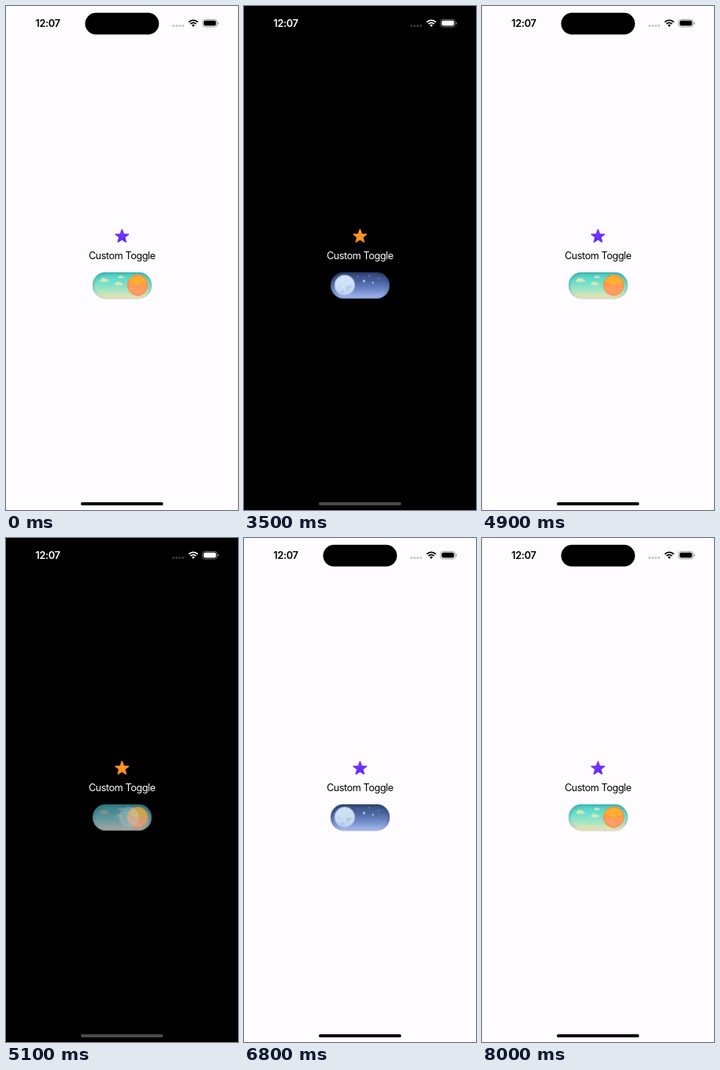
Recreate the animation shown at these times as an HTML page with a canvas. Size 300 by 651 pixels, loop 8100 ms.

```html
<!DOCTYPE html>
<html lang="en">
<head>
<meta charset="utf-8">
<title>Custom Toggle</title>
<style>
html, body { margin: 0; width: 100%; height: 100%; overflow: hidden; background: #fefcff; }
canvas { display: block; width: 300px; height: 651px; }
</style>
</head>
<body>
<canvas id="stage"></canvas>
<script>
const W = 300, H = 651, LOOP = 8100, STEP = 100;
const TAU = Math.PI * 2;
const scale = Math.max(1, window.devicePixelRatio || 1);
const stage = document.getElementById('stage');
stage.width = W * scale;
stage.height = H * scale;
const ctx = stage.getContext('2d');
ctx.scale(scale, scale);

// Each tap: first visible time and how far the spring has already run (ms).
const taps = [
  { at: 2600, lead: 142, night: true },
  { at: 3700, lead: 63, night: false },
  { at: 5100, lead: 80, night: true },
  { at: 6800, lead: 16, night: false }
];
const STIFF = 13;
const DAY_X = 170.3, NIGHT_X = 130.2, KNOB_Y = 360.5;
const pill = { x: 112, y: 343.7, w: 76.4, h: 34.3 };

const themes = {
  day: { bg: '#fefcff', ink: '#000', star: ['#8036f0', '#5a2bff'], dots: '#c5c3c7', home: '#000', shell: '#8f8d92' },
  night: { bg: '#000', ink: '#fff', star: ['#ff9a2c', '#ff8a1e'], dots: '#3c3c3c', home: '#4a4a4a', shell: '#8a8a8a' }
};

function spring(ms) {
  const k = STIFF * ms / 1000;
  return 1 - (1 + k) * Math.exp(-k);
}

function disc(c, x, y, r, fill) {
  c.fillStyle = fill;
  c.beginPath();
  c.arc(x, y, r, 0, TAU);
  c.fill();
}

function box(c, x, y, w, h, r, fill) {
  c.fillStyle = fill;
  c.beginPath();
  c.roundRect(x, y, w, h, r);
  c.fill();
}

function ramp(c, y0, y1, colors) {
  const g = c.createLinearGradient(0, y0, 0, y1);
  colors.forEach((color, i) => g.addColorStop(i / (colors.length - 1), color));
  return g;
}

function layer(w, h, draw) {
  const canvas = document.createElement('canvas');
  canvas.width = Math.ceil(w * scale);
  canvas.height = Math.ceil(h * scale);
  const c = canvas.getContext('2d');
  c.scale(scale, scale);
  draw(c);
  return { canvas, w: canvas.width / scale, h: canvas.height / scale };
}

// Recessed capsule: scenery plus a soft shade along the upper rim.
function track(colors, shade, scenery) {
  return layer(pill.w, pill.h, c => {
    c.beginPath();
    c.roundRect(0, 0, pill.w, pill.h, pill.h / 2);
    c.clip();
    c.fillStyle = ramp(c, 0, pill.h, colors);
    c.fillRect(0, 0, pill.w, pill.h);
    scenery(c);
    c.shadowColor = shade;
    c.shadowBlur = 5 * scale;
    c.shadowOffsetY = 1.6 * scale;
    c.fillStyle = shade;
    c.beginPath();
    c.rect(-20, -20, pill.w + 40, pill.h + 40);
    c.roundRect(0, 0, pill.w, pill.h, pill.h / 2);
    c.fill('evenodd');
  });
}

function cloud(c, x, y, s) {
  const fill = ramp(c, y - 3 * s, y + 3 * s, ['#f1e6ac', '#c9e7bd']);
  c.fillStyle = fill;
  c.beginPath();
  c.ellipse(x, y + s, 6 * s, 1.7 * s, 0, 0, TAU);
  c.fill();
  disc(c, x - 1.8 * s, y - 0.2 * s, 2.3 * s, fill);
  disc(c, x + 1.7 * s, y + 0.1 * s, 2 * s, fill);
}

function twinkle(c, x, y, r) {
  c.fillStyle = '#bcd0f5';
  c.beginPath();
  for (let i = 0; i < 8; i++) {
    const a = i * TAU / 8, d = i % 2 ? r * 0.42 : r;
    c.lineTo(x + d * Math.cos(a), y + d * Math.sin(a));
  }
  c.fill();
}

const daySky = track(['#4acfc6', '#66dfce', '#a2e5c5', '#f4e4b0'], 'rgba(15,85,100,.62)', c => {
  cloud(c, 15.3, 10, 1);
  cloud(c, 36.8, 6, 0.65);
  cloud(c, 34, 14.6, 0.9);
});

const nightSky = track(['#324776', '#465f9d', '#7089c7', '#a6bdf4'], 'rgba(12,24,52,.62)', c => {
  const stars = [[43.2, 11.6, 2.5], [54.8, 13.7, 1.8], [50, 4.5, 1.2], [62, 8.5, 1.1], [35, 5.2, 0.8], [67, 15.5, 0.7]];
  stars.forEach(s => twinkle(c, ...s));
});

const sun = layer(28, 28, c => {
  c.beginPath();
  c.arc(14, 14, 13.4, 0, TAU);
  c.clip();
  c.fillStyle = ramp(c, 0, 28, ['#ffab2b', '#ffb033', '#ff9e45']);
  c.fillRect(0, 0, 28, 28);
  c.fillStyle = ramp(c, 11, 28, ['#ff9a43', '#ff9e63', '#ff9c66']);
  c.beginPath();
  c.moveTo(0, 9);
  c.bezierCurveTo(7, 10, 7, 14, 14, 13.4);
  c.bezierCurveTo(20, 13, 21, 11, 28, 11);
  c.lineTo(28, 28);
  c.lineTo(0, 28);
  c.fill();
  c.lineWidth = 1.3;
  c.strokeStyle = 'rgba(240,116,78,.6)';
  c.beginPath();
  c.arc(14, 14, 12.9, 0, TAU);
  c.stroke();
});

const moon = layer(28, 28, c => {
  disc(c, 14, 14, 13.2, ramp(c, 0, 28, ['#d3e7fb', '#cfe3f8', '#bbd2ef']));
  const craters = [[18.5, 17, 2.4], [22.2, 15.8, 1.4], [11, 22.5, 1.9], [7, 15, 1.2], [16.5, 20.5, 1]];
  craters.forEach(([x, y, r]) => disc(c, x, y, r, 'rgba(145,174,205,.42)'));
  c.lineWidth = 0.8;
  c.strokeStyle = 'rgba(150,180,220,.55)';
  c.beginPath();
  c.arc(14, 14, 12.8, 0, TAU);
  c.stroke();
});

function put(art, x, y, alpha) {
  ctx.globalAlpha = alpha;
  ctx.drawImage(art.canvas, x, y, art.w, art.h);
  ctx.globalAlpha = 1;
}

function label(text, x, y, font, align, spacing, color) {
  ctx.font = font + ' Inter, Roboto, sans-serif';
  ctx.letterSpacing = spacing + 'px';
  ctx.textAlign = align;
  ctx.textBaseline = 'alphabetic';
  ctx.fillStyle = color;
  ctx.fillText(text, x, y);
}

function statusBar(theme) {
  label('12:07', 38, 27, '600 13px', 'left', -0.35, theme.ink);
  box(ctx, 102.3, 8.8, 95.5, 28, 14, '#000');
  for (let i = 0; i < 4; i++) disc(ctx, 216.6 + i * 4.05, 25.6, 1.5, theme.dots);

  ctx.strokeStyle = theme.ink;
  ctx.lineWidth = 1.9;
  const fan = [-Math.PI * 0.75, -Math.PI * 0.25];
  for (const r of [8.3, 5.1]) {
    ctx.beginPath();
    ctx.arc(242.2, 26.7, r, ...fan);
    ctx.stroke();
  }
  ctx.fillStyle = theme.ink;
  ctx.beginPath();
  ctx.moveTo(242.2, 27);
  ctx.arc(242.2, 26.7, 2.8, ...fan);
  ctx.fill();

  ctx.strokeStyle = theme.shell;
  ctx.lineWidth = 0.8;
  ctx.beginPath();
  ctx.roundRect(254.2, 17.4, 18.8, 9.6, 3.1);
  ctx.stroke();
  box(ctx, 255.6, 18.8, 16, 6.8, 2, theme.ink);
  box(ctx, 273.9, 20.7, 1.1, 3.1, 0.6, theme.shell);
}

function star(colors) {
  ctx.fillStyle = ctx.strokeStyle = ramp(ctx, 288, 306, colors);
  ctx.lineWidth = 1.4;
  ctx.lineJoin = 'round';
  ctx.beginPath();
  for (let i = 0; i < 10; i++) {
    const a = -Math.PI / 2 + i * Math.PI / 5, r = i % 2 ? 3.7 : 8.9;
    ctx.lineTo(150 + r * Math.cos(a), 297.6 + r * Math.sin(a));
  }
  ctx.closePath();
  ctx.fill();
  ctx.stroke();
}

function toggle(night, p) {
  const from = night ? DAY_X : NIGHT_X, to = night ? NIGHT_X : DAY_X;
  const x = from + (to - from) * p;
  const [oldSky, newSky] = night ? [daySky, nightSky] : [nightSky, daySky];
  const [oldKnob, newKnob] = night ? [sun, moon] : [moon, sun];
  put(oldSky, pill.x, pill.y, 1 - p);
  put(newSky, pill.x, pill.y, p);
  // The outgoing knob fades in place while the incoming one slides away from it.
  put(oldKnob, from - 14, KNOB_Y - 14, 1 - p);
  put(newKnob, x - 14, KNOB_Y - 14, p);
}

function render(time) {
  const t = Math.floor((time % LOOP) / STEP) * STEP;
  const tap = taps.filter(item => item.at <= t).pop();
  const night = Boolean(tap && tap.night);
  const theme = night ? themes.night : themes.day;
  const p = tap ? spring(t - tap.at + tap.lead) : 1;

  document.body.style.background = theme.bg;
  ctx.fillStyle = theme.bg;
  ctx.fillRect(0, 0, W, H);
  statusBar(theme);
  star(theme.star);
  label('Custom Toggle', 150, 327, '400 12.8px', 'center', -0.4, theme.ink);
  toggle(night, p);
  box(ctx, 96.7, 641, 106.6, 4, 2, theme.home);
}

const start = performance.now();
function tick() {
  render(performance.now() - start);
  requestAnimationFrame(tick);
}
tick();
</script>
</body>
</html>
```
